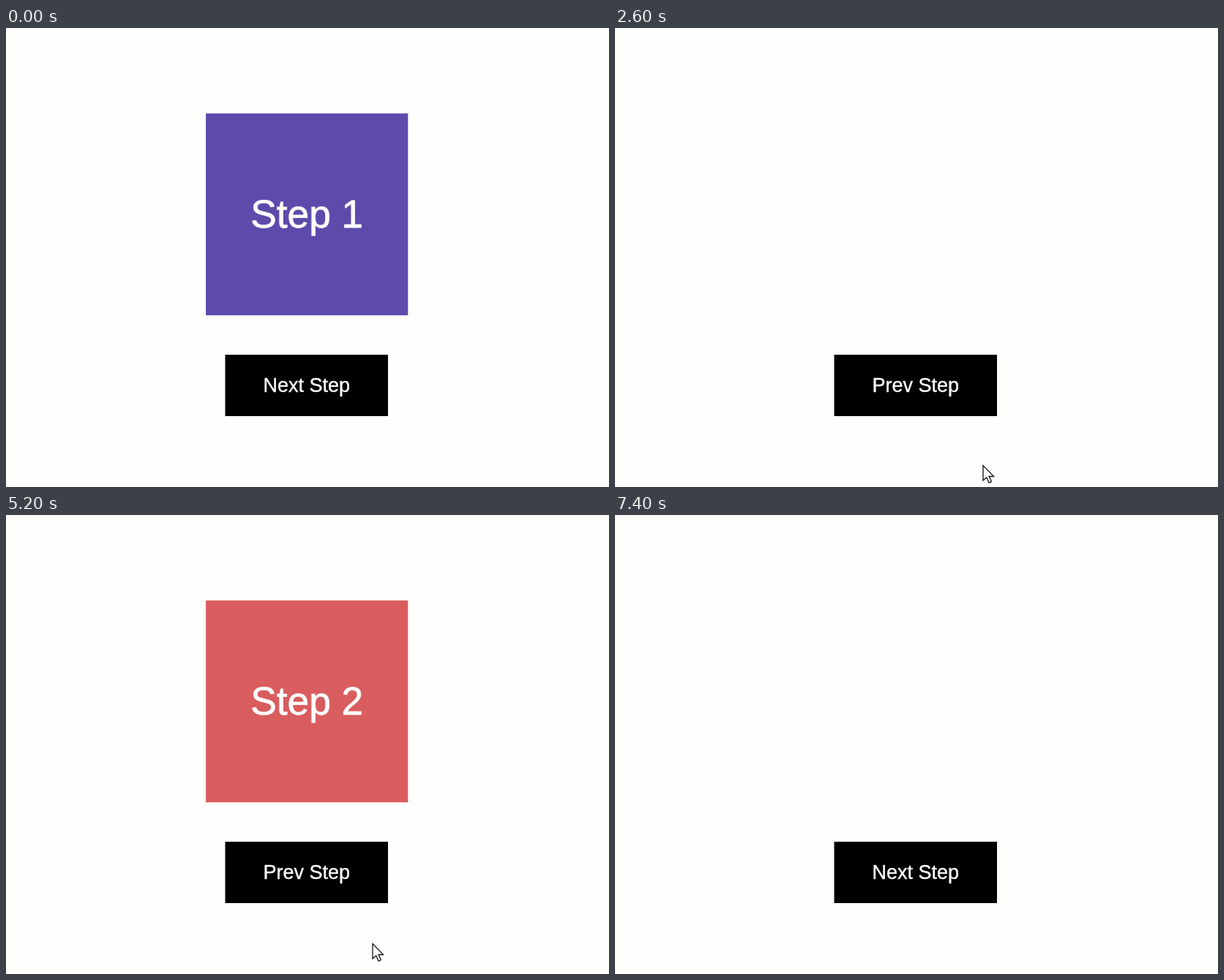
These frames come from a looping animation (824 px wide and 628 px high, 8000 ms). An HTML page with a canvas:

```html
<!DOCTYPE html>
<html lang="en">
<head>
<meta charset="utf-8">
<title>Step transition</title>
<style>
  html, body { margin: 0; width: 100%; height: 100%; overflow: hidden; background: #fefefd; }
  canvas { display: block; }
</style>
</head>
<body>
<canvas id="stage" width="824" height="628"></canvas>
<script>
const ctx = document.getElementById("stage").getContext("2d");
const LOOP = 8000, TICK = 200, FADE = 1490;
const FIRST_CLICK = 715, ENTER = 3340, SECOND_CLICK = 5562;
const PAPER = "#fefefd", PURPLE = "#5e4aab", RED = [217, 93, 95];
const CENTER_X = 411.2, CENTER_Y = 255, SIDE = 276.2;
const BUTTON = { x: 299.5, y: 447, w: 222.5, h: 84 };

// Pointer paths as [time, x, y]; the pointer is hidden over the button.
const PATHS = [
  [[200, 40, 520], [600, 400, 490], [800, 440, 500], [1000, 490, 550], [1200, 503, 598], [5000, 503, 598]],
  [[5000, 503, 598], [5200, 501, 586], [5400, 470, 525], [5600, 450, 500]]
];
const ARROW = [[0, 0], [0, 16], [3.7, 12.7], [6.3, 18.6], [8.9, 17.4], [6.3, 11.7], [11.4, 11.7]];

const clamp = v => Math.min(1, Math.max(0, v));
const progress = (t, start) => clamp((t - start) / FADE);

// A thin outline gives the glyphs their slightly heavier weight.
function label(text, x, y, size, weight) {
  ctx.font = `${size}px "Liberation Sans", Arial, sans-serif`;
  ctx.textAlign = "center";
  ctx.fillStyle = ctx.strokeStyle = "#fefefe";
  ctx.lineWidth = weight;
  ctx.lineJoin = "round";
  ctx.fillText(text, x, y);
  ctx.strokeText(text, x, y);
}

function drawCard(text, color, visible) {
  if (visible <= 0) return;
  ctx.save();
  ctx.translate(CENTER_X, CENTER_Y);
  ctx.scale(0.7 + 0.3 * visible, 0.7 + 0.3 * visible);
  ctx.globalAlpha = visible;
  ctx.fillStyle = color;
  ctx.fillRect(-SIDE / 2, -SIDE / 2, SIDE, SIDE);
  ctx.globalAlpha = 1;
  label(text, 0, 18, 53.3, 0.8);
  ctx.restore();
}

function drawButton(t) {
  const clicked = t >= SECOND_CLICK ? SECOND_CLICK : FIRST_CLICK;
  const flash = t >= clicked ? clamp(1 - (t - clicked) / 400) : 0;
  ctx.fillStyle = `rgb(${RED.map(c => Math.round(c * flash)).join()})`;
  ctx.fillRect(BUTTON.x, BUTTON.y, BUTTON.w, BUTTON.h);
  const back = t >= FIRST_CLICK && t < SECOND_CLICK;
  label(back ? "Prev Step" : "Next Step", CENTER_X - 0.5, 497.5, 27, 0.4);
}

function pointerAt(t) {
  for (const path of PATHS) {
    for (let i = 1; i < path.length; i++) {
      const [t0, x0, y0] = path[i - 1], [t1, x1, y1] = path[i];
      if (t < t0 || t >= t1) continue;
      const k = (t - t0) / (t1 - t0);
      return [x0 + (x1 - x0) * k, y0 + (y1 - y0) * k];
    }
  }
  return null;
}

function drawPointer(t) {
  const at = pointerAt(t);
  if (!at) return;
  const [x, y] = at;
  const inside = x > BUTTON.x && x < BUTTON.x + BUTTON.w && y > BUTTON.y && y < BUTTON.y + BUTTON.h;
  if (inside) return;
  ctx.beginPath();
  for (const [px, py] of ARROW) ctx.lineTo(x + px * 1.28, y + 0.5 + py * 1.28);
  ctx.closePath();
  ctx.fillStyle = "#fff";
  ctx.fill();
  ctx.lineJoin = "miter";
  ctx.lineWidth = 1.3;
  ctx.strokeStyle = "#111";
  ctx.stroke();
}

function draw(t) {
  ctx.fillStyle = PAPER;
  ctx.fillRect(0, 0, 824, 628);
  drawCard("Step 1", PURPLE, 1 - progress(t, FIRST_CLICK));
  drawCard("Step 2", `rgb(${RED})`, progress(t, ENTER) - progress(t, SECOND_CLICK));
  drawButton(t);
  drawPointer(t);
}

const begin = performance.now();
function frame() {
  const t = (performance.now() - begin) % LOOP;
  draw(Math.floor(t / TICK) * TICK);
  requestAnimationFrame(frame);
}
frame();
</script>
</body>
</html>
```
